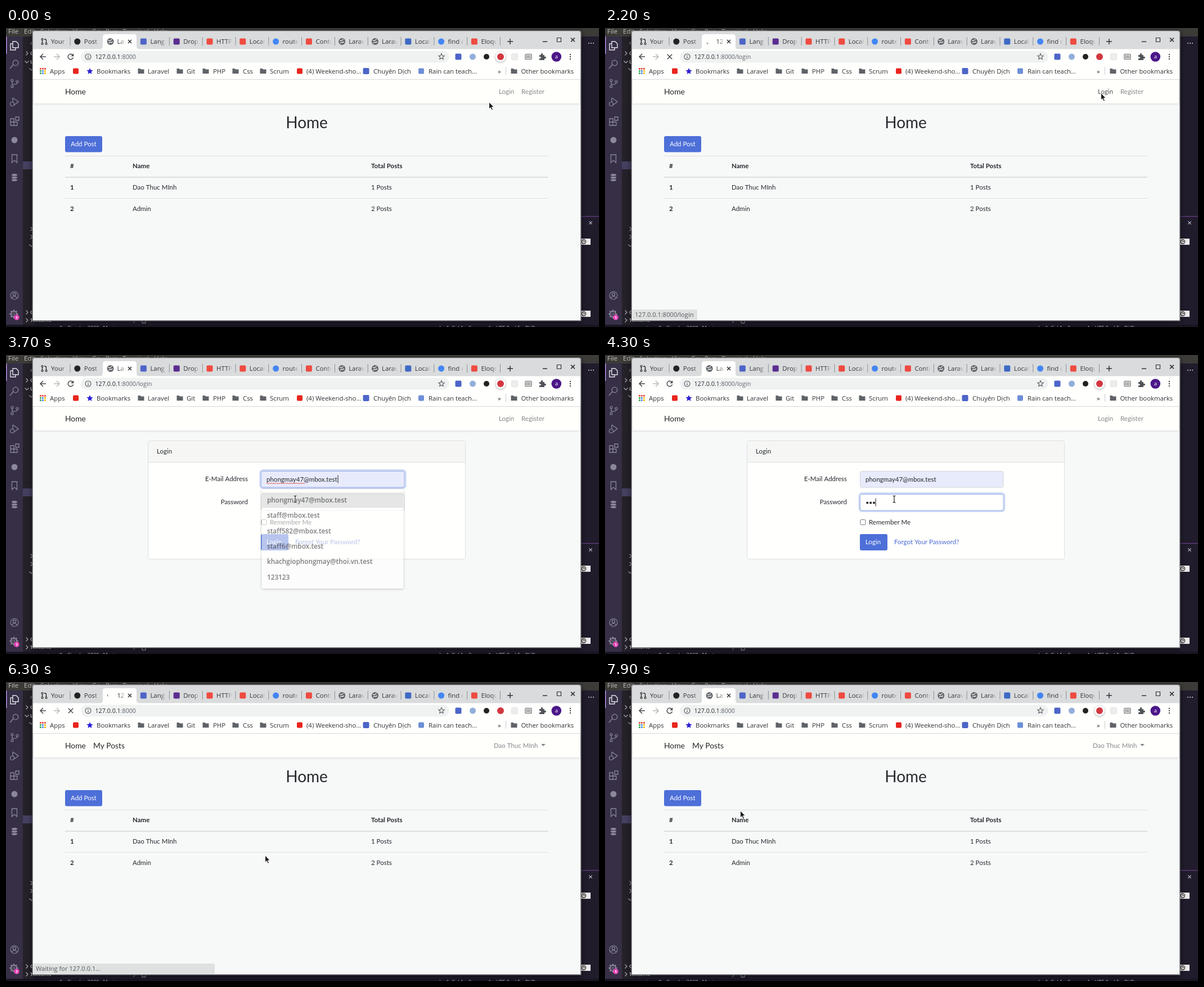
These frames come from a looping animation (1054x531 px, 8000 ms). An HTML page with a canvas:

```html
<!DOCTYPE html>
<html lang="en">
<head>
<meta charset="utf-8">
<title>Login flow</title>
<style>
html, body { margin: 0; width: 100%; height: 100%; overflow: hidden; background: #211c2c; }
canvas { display: block; }
</style>
</head>
<body>
<canvas id="stage" width="1054" height="531"></canvas>
<script>
const c = document.getElementById('stage').getContext('2d');
const LOOP = 8000, STEP = 100;
const UI = '"Open Sans", "Noto Sans", sans-serif', PAGE = 'Lato, sans-serif';
const INK = '#303236', BLUE = '#4d6fd8', RED = '#ef4a40', LINE = '#dcdfe0';
const USER = 'Dao Thuc MInh', EMAIL = 'phongmay47@mbox.test', HOST = '127.0.0.1:8000';
const SAVED = [EMAIL, 'staff@mbox.test', 'staff582@mbox.test', 'staff6@mbox.test',
  'khachgiophongmay@thoi.vn.test', '123123'];

// Pointer path: time, x, y
const PATH = [[0, 858, 131], [100, 858, 131], [500, 600, 190], [700, 450, 202], [900, 314, 158],
  [1000, 314, 158], [1100, 129, 150], [1200, 250, 135], [1300, 470, 122], [1400, 377, 117],
  [1500, 377, 117], [1700, 914, 112], [1900, 881, 115], [2300, 881, 115], [2800, 506, 220],
  [3000, 506, 220], [3200, 514, 256], [5200, 514, 256], [5700, 488, 316], [5900, 479, 336],
  [6200, 479, 336], [6500, 422, 250], [6900, 243, 166], [7300, 140, 204], [7500, 135, 206],
  [7600, 300, 225], [7700, 562, 236], [7900, 240, 228], [8000, 240, 228]];

const within = (t, a, b) => t >= a && t < b;

function pointerAt(t) {
  const i = Math.max(1, PATH.findIndex(k => k[0] >= t));
  const [t0, x0, y0] = PATH[i - 1], [t1, x1, y1] = PATH[i];
  const p = (t - t0) / (t1 - t0);
  return [x0 + (x1 - x0) * p, y0 + (y1 - y0) * p];
}

function rect(x, y, w, h, fill, r = 0, stroke, lw = 1) {
  c.beginPath();
  c.roundRect(x, y, w, h, r);
  if (fill) { c.fillStyle = fill; c.fill(); }
  if (stroke) { c.strokeStyle = stroke; c.lineWidth = lw; c.stroke(); }
}
function circle(x, y, r, fill, stroke, lw = 1) {
  rect(x - r, y - r, 2 * r, 2 * r, fill, r, stroke, lw);
}
function text(s, x, y, size, color = INK, font = UI, weight = 400, align = 'left') {
  c.font = `${weight} ${size}px ${font}`;
  c.fillStyle = color;
  c.textAlign = align;
  c.fillText(s, x, y);
}
const pageText = (s, x, y, color = '#25292d', weight = 400, size = 11.5) =>
  text(s, x, y, size, color, PAGE, weight);

// Draws an SVG path with its origin at x, y
function draw(d, x, y, stroke, lw = 1.3, fill) {
  c.save();
  c.translate(x, y);
  const p = new Path2D(d);
  if (fill) { c.fillStyle = fill; c.fill(p); }
  if (stroke) { c.strokeStyle = stroke; c.lineWidth = lw; c.stroke(p); }
  c.restore();
}
function faded(alpha, paint) {
  c.save();
  c.globalAlpha = alpha;
  paint();
  c.restore();
}
function shadowed(blur, dy, color, paint) {
  c.save();
  c.shadowBlur = blur; c.shadowOffsetY = dy; c.shadowColor = color;
  paint();
  c.restore();
}
const square = (x, y, color, s = 11) => rect(x - s / 2, y - s / 2, s, s, color, 2);
const cross = (x, y, r, color = INK, lw = 1.4) =>
  draw(`M${-r} ${-r}L${r} ${r}M${r} ${-r}L${-r} ${r}`, x, y, color, lw);
const folder = (x, y) => draw('M-5.5 -4.5h4l1.5 1.5h5.5v7.5h-11z', x, y, 0, 0, '#5f6368');
const star = r => 'M' + Array.from({ length: 10 }, (_, i) => {
  const a = i * Math.PI / 5, q = i % 2 ? r * .45 : r;
  return `${q * Math.sin(a)} ${-q * Math.cos(a)}`;
}).join('L') + 'z';

function globe(x, y) {
  circle(x, y, 6, '#5f6368');
  draw('M-4 -2.5q2 2 4 .5t2.5 -2M-3 3.5q1 -3 3 -2t3.5 -1.5', x, y, '#e8e9ea', 1.5);
}
function pullIcon(x, y) {
  draw('M-3.5 -2v5M3.5 3v-5q0 -2 -2 -2h-1.5', x, y, '#222', 1.3);
  [[-3.5, -4], [-3.5, 4], [3.5, 4]].forEach(([a, b]) => circle(x + a, y + b, 1.5, '#dcdedf', '#222', 1.2));
}

function editor() {
  rect(0, 0, 1054, 531, '#211c2c');
  rect(0, 0, 1054, 15, '#3c3b38');
  text('File', 4, 10, 11.5, '#c3c1bc');
  text('Edit   Selection   View   Go   Run   Terminal   Help', 32, 10, 11.5, '#c3c1bc');
  rect(0, 15, 30, 516, '#362f46');
  rect(30, 15, 20, 516, '#242129');
  rect(30, 237, 20, 14, '#454060');
  rect(0, 15, 1.5, 31, '#b58be0');
  const g = '#8c879a';
  draw('M-3 -7h6l4 4v7h-10zM-3 -3h-4v11h9v-4', 15, 31, '#e4e2ea', 1.4);
  circle(17, 62, 4.8, 0, g, 1.3);
  draw('M-3 3l-6 7', 16, 62, g, 1.4);
  draw('M-4 -3v7M5 -1q0 4 -8 3', 15, 98, g);
  [[-4, -5], [-4, 6], [5, -3]].forEach(([x, y]) => circle(15 + x, 98 + y, 2, 0, g, 1.2));
  draw('M-3 -8l10 7l-8 6M-3 -8v7', 15, 132, g);
  circle(11, 135, 3.5, 0, g, 1.2);
  draw('M-7 -4h6v6h6v6h-12zM-7 2h6v6M2 -7h6v6h-6z', 15, 165, g);
  circle(15, 199, 5.5, g);
  draw('M-4.5 -7h9v14l-4.5 -4l-4.5 4z', 15, 232, g);
  [270, 265.5, 261].forEach(y => {
    c.beginPath();
    c.ellipse(15, y, 5.5, 2.6, 0, 0, 2 * Math.PI);
    c.fillStyle = g; c.fill();
    c.strokeStyle = '#362f46'; c.lineWidth = .8; c.stroke();
  });
  circle(15, 475, 7, 0, g, 1.2);
  circle(15, 473, 2.6, 0, g, 1.2);
  draw('M-5 5q5 -7 10 0', 15, 475, g, 1.2);
  circle(14, 508, 5, 0, g, 2);
  circle(14, 508, 2, 0, g);
  for (let i = 0; i < 8; i++) {
    c.save();
    c.translate(14, 508);
    c.rotate(i * Math.PI / 4);
    rect(-1.2, -7.5, 2.4, 2.5, g);
    c.restore();
  }
  circle(19, 514, 4.8, '#e647b8');
  text('1', 19, 516.5, 6.5, '#fff', UI, 700, 'center');

  text('F', 43, 30, 8, '#aaa6b2');
  const right = 'M-1.5 -3.5l3.5 3.5l-3.5 3.5', down = 'M-3.5 -1.5l3.5 3.5l3.5 -3.5';
  [[right, 37, 45], [down, 37, 60], [down, 45, 73], [right, 45, 357], [right, 45, 371],
    [down, 45, 386], [right, 37, 505], [right, 37, 519]].forEach(([d, x, y]) => draw(d, x, y, '#b0acb8', 1.1));
  [['C', 48], ['L', 63], ['OUTLINE', 508], ['TIMELINE', 522]]
    .forEach(([s, y]) => text(s, 43, y, 8, '#ccc', UI, 700));
  draw('M0 -3l3 3l-3 3', 226, 521, '#bbb', 1);
  rect(242, 517, 6, 7, 0, 0, '#bbb');
  rect(0, 527, 1054, 4, '#191521');
  text('master    0    Simple   2020   Master', 56, 536, 9, '#bdb9c6');
  text('Ln 1, Col 1    Spaces: 4    UTF-8    LF    PHP', 770, 536, 9, '#bdb9c6');
  [-4, 0, 4].forEach(d => circle(1040 + d, 27, 1, '#cfcbd6'));
  rect(1022, 334, 32, 1.2, '#6c3f86');
  cross(1039, 346, 2.7, '#c4c0cc', 1.1);
  [374, 502].forEach(y => {
    rect(1020, y, 19, 11, '#eceaea');
    circle(1027, y + 5.5, 3.6, 0, '#222', 1.2);
    draw('M0 -2v2h2', 1027, y + 5.5, '#222', 1);
  });
}

const swatch = color => (x, y) => square(x, y, color);
const disc = color => (x, y) => circle(x, y, 5.5, color);
const TABS = [['Your', pullIcon], ['Post', disc('#222')], ['Laravel', globe], ['Lang', swatch('#4d65c8')],
  ['Drop', swatch('#5b2d91')], ['HTTP', swatch(RED)], ['Local', swatch(RED)], ['route', disc('#4285f4')],
  ['Contr', swatch(RED)], ['Larav', globe], ['Larav', globe], ['Local', swatch('#3e6ac5')],
  ['find c', disc('#4285f4')], ['Eloqu', swatch(RED)]];

function tabs(t, loading) {
  draw('M-6 0q6 0 6 -6v-16q0 -5 5 -5h50q5 0 5 5v16q0 6 6 6z', 172, 38, 0, 0, '#fffffd');
  TABS.forEach(([name, icon], i) => {
    const x = 55 + 58.8 * i, active = i === 2, busy = active && loading;
    if (busy) {
      const a = (t / 800) * 2 * Math.PI + 3.6;
      c.beginPath(); c.arc(x + 13, 24, 5, a, a + .7);
      c.strokeStyle = '#777'; c.lineWidth = 1.2; c.stroke();
    } else icon(x + 13, 24);
    const end = x + (active ? 40 : 53);
    const fade = c.createLinearGradient(end - 10, 0, end, 0);
    fade.addColorStop(0, INK);
    fade.addColorStop(1, '#30323600');
    c.save();
    c.beginPath(); c.rect(x + 24, 12, end - x - 24, 24); c.clip();
    text(busy ? HOST : name, x + 25, 28, 11.4, fade);
    c.restore();
    if (i !== 1 && !active) rect(x + 58.5, 16, 1, 15, '#8d9093');
  });
  cross(220, 24, 3, INK, 1.5);
  draw('M-5 0h10M0 -5v10', 896, 24, INK, 1.5);
  rect(954, 23.5, 8, 1.5, INK);
  rect(979.5, 17.5, 7, 7, 0, 0, INK, 1.2);
  cross(1007.5, 21, 3.4, INK, 1.5);
}

function toolbar(url, loading) {
  draw('M5 0h-10M0 -5l-5 5l5 5', 66, 51, '#45484c', 1.5);
  draw('M-5 0h10M0 -5l5 5l-5 5', 90, 51, '#b7babd', 1.5);
  if (loading) cross(115, 51, 4.2, '#45484c', 1.5);
  else {
    c.beginPath(); c.arc(115, 51, 4.7, .3, 5.5);
    c.strokeStyle = '#45484c'; c.lineWidth = 1.5; c.stroke();
    draw('M0 0h-5l5 -5z', 120.3, 50.3, 0, 0, '#45484c');
  }
  rect(133, 40.5, 655, 21, '#f0f2f2', 10.5);
  circle(146, 51, 5, 0, '#5f6368', 1.2);
  draw('M0 -3v1.5M0 -.5v3.5', 146, 51, '#5f6368', 1.3);
  const [ip, port] = HOST.split(':');
  text(ip, 158.5, 55, 10.7, '#26282b');
  text(`:${port}${url}`, 158.5 + c.measureText(ip).width, 55, 10.7, '#5f6368');
  draw(star(5.5), 774, 51, '#555a5e', 1.1);

  square(804, 51, '#4d65c8');
  circle(829.5, 51, 5.5, '#92aedb');
  circle(854, 51, 5, '#222');
  if (!loading) shadowed(4, 1, '#0005', () => circle(879, 51, 9, '#fff'));
  circle(879, 51, 6, '#d3373f');
  rect(898.5, 45.5, 11, 11, '#eceeee', 2, '#e0e2e2');
  rect(923, 46.5, 11, 9, 0, 1, '#5f6368', 1.2);
  for (let i = 0; i < 3; i++) rect(925.2 + 2.6 * i, 48, 1.3, 6, '#5f6368');
  draw('M-5 -3h3q-1 -3 1.5 -3t1.5 3h3v3q3 -1 3 1.5t-3 1.5v3h-9v-3q3 0 3 -1.5t-3 -1.5z', 953, 51, 0, 0, '#505458');
  circle(978.3, 51, 8.8, '#4b1689');
  text('a', 978.3, 54.3, 9.5, '#fff', UI, 400, 'center');
  [-4, 0, 4].forEach(d => circle(1003, 51 + d, 1.2, '#45484c'));
}

function bookmarks() {
  ['#ea4335', '#ea4335', '#ea4335', '#34a853', '#4285f4', '#fbbc05', '#34a853', '#4285f4', '#fbbc05']
    .forEach((k, i) => rect(60 + i % 3 * 4, 71 + Math.floor(i / 3) * 4, 2.8, 2.8, k));
  square(124, 76.5, '#e8251f', 10);
  draw(star(6), 149, 77, 0, 0, '#2b1fd6');
  [240, 309, 355, 408, 457, 903].forEach(x => folder(x, 76.5));
  square(522, 76.5, '#e8251f', 10);
  square(640, 76.5, '#4d65c8');
  square(738, 76.5, '#6d8fd6', 10);
  [['Apps', 78], ['Bookmarks', 161], ['Laravel', 252], ['Git', 321], ['PHP', 368], ['Css', 421],
    ['Scrum', 469], ['(4) Weekend-sho…', 534], ['Chuyên Dịch', 653], ['Rain can teach…', 751],
    ['»', 874], ['Other bookmarks', 915.5]].forEach(([s, x]) => text(s, x, 80.5, 11.4));
  rect(888, 69, 1, 14, '#c8cbcd');
}

function navbar(user, hoverLogin) {
  shadowed(4, 1, '#0002', () => rect(49, 92, 971, 42, '#fffffb'));
  rect(49, 91, 971, 1, '#d8dadb');
  pageText('Home', 105, 118, '#222', 400, 13.8);
  if (user) {
    pageText('My Posts', 155, 118, '#222', 400, 13.8);
    pageText(USER, 867, 116.5, '#85888a');
    draw('M-4 -2h8l-4 4z', 955, 112, 0, 0, '#85888a');
  } else {
    pageText('Login', 876, 116.5, hoverLogin ? '#505356' : '#85888a');
    pageText('Register', 916, 116.5, '#85888a');
  }
}

function home(hoverAdd) {
  text('Home', 534.5, 178, 28, '#25292d', PAGE, 400, 'center');
  rect(105, 192, 66, 28.5, hoverAdd ? '#3a5bc0' : BLUE, 3);
  pageText('Add Post', 115, 210, '#fff');
  [[227, 1], [264, 2], [302, 1]].forEach(([y, h]) => rect(105, y, 859, h, LINE));
  [['#', 'Name', 'Total Posts'], ['1', USER, '1 Posts'], ['2', 'Admin', '2 Posts']].forEach((row, r) =>
    row.forEach((s, i) => pageText(s, [114, 225, 649][i], 249 + 37.9 * r, '#25292d', r && i ? 400 : 700)));
}

function field(y, focus, fill) {
  if (focus) rect(452, y - 1.5, 258, 32, 0, 5, '#cbd8f5', 3);
  rect(453.5, y + .5, 254.5, 28.5, fill, 3, focus ? '#9db2e8' : '#cfd5da');
}
const caret = (x, y) => rect(x, y, 1, 14, '#222');

function suggestions(t) {
  const alpha = { 3600: .92, 3700: .6, 3800: .2 }[t] ?? (within(t, 3000, 3600) ? 1 : 0);
  if (!alpha) return;
  const scale = .96 + .04 * alpha;
  const panel = () => rect(452.5, 236.5, 256, 179.5, '#fffffd', 2);
  faded(alpha, () => {
    c.translate(580.5, 327); c.scale(scale, scale); c.translate(-580.5, -327);
    // A shadow under a translucent panel would grey it, so keep it outside
    c.save();
    const outside = new Path2D('M0 0H1054V531H0z');
    outside.rect(452.5, 236.5, 256, 179.5);
    c.clip(outside, 'evenodd');
    shadowed(4, 1, '#0006', panel);
    c.restore();
    panel();
    if (t >= 3200) rect(453, 243, 255, 27.5, '#d4d5d5');
    SAVED.forEach((s, i) => text(s, 462, 261 + 27.8 * i, 12, '#26282b', UI, 600));
  });
}

function login(t) {
  const onPassword = t >= 4000, filled = t >= 3600, preview = within(t, 3200, 3600);
  rect(252.5, 152.5, 564, 210, '#fffffd', 3, LINE);
  rect(253, 153, 563, 37, '#f6f7f5', [3, 3, 0, 0]);
  rect(253, 190, 563, 1, LINE);
  pageText('Login', 268, 175);
  text('E-Mail Address', 430, 224, 11.5, '#25292d', PAGE, 400, 'right');
  text('Password', 430, 265, 11.5, '#25292d', PAGE, 400, 'right');
  field(206, !onPassword, filled || preview ? '#e8ebfb' : '#fffffd');
  field(247, onPassword, '#fffffd');
  if (filled || preview) pageText(EMAIL, 463, 225);
  if (filled && !onPassword) {
    const end = c.measureText(EMAIL).width, word = c.measureText(EMAIL.split('@')[0]).width;
    draw('M0 0' + 'q1 -1.5 2 0t2 0'.repeat(Math.round(word / 4)), 463, 228, '#e04848', .9);
    caret(464 + end, 213.5);
  } else if (!onPassword && !within(t, 3000, 3400)) caret(464, 213.5);
  if (onPassword) {
    const typed = [4200, 4300, 4300, 4500, 4800, 5000, 5000, 5000].filter(k => t >= k).length;
    for (let i = 0; i < typed; i++) circle(466.3 + 5.9 * i, 262.5, 2.1, '#25292d');
    caret(463 + 5.9 * typed, 254.5);
  }
  rect(454, 292.5, 9, 9, '#fff', 1.5, '#75787b');
  pageText('Remember Me', 469, 300.5);
  rect(453, 318, 49, 29, BLUE, 3);
  pageText('Login', 463, 336, '#fff');
  pageText('Forgot Your Password?', 514, 336, '#4a6bd2');
  suggestions(t);
}

function status(t) {
  const show = (s, w, alpha) => faded(alpha, () => {
    rect(49, 500, w, 18.5, '#dfe1e1', [0, 3, 0, 0]);
    text(s, 53, 513, 11.1, '#565a5e');
  });
  if (within(t, 2100, 2500)) show(HOST + '/login', 115, t < 2400 ? 1 : .4);
  if (within(t, 6200, 7000)) show('Waiting for 127.0.0.1…', 322, t < 6800 ? 1 : t < 6900 ? .7 : .4);
  if (within(t, 7300, 7700)) show(HOST + '/posts/create', 152, t < 7600 ? 1 : .4);
}

function pointer(t) {
  const [x, y] = pointerAt(t);
  if (within(t, 2700, 5400)) {
    const beam = 'M-2.5 -6q2.5 0 2.5 1.5v9q0 1.5 -2.5 1.5M2.5 -6q-2.5 0 -2.5 1.5M0 4.5q0 1.5 2.5 1.5';
    draw(beam, x, y, '#fff', 2.6);
    draw(beam, x, y, '#222', 1.2);
  } else if (within(t, 5600, 6300) || within(t, 7300, 7600)) {
    draw('M-2.5 -5.5q1.3 -1.2 2 .5v4l4.5 1q2 .5 1.5 2.5l-1 4h-6l-4 -4.5q-.5 -2 1.5 -1l1.5 1z', x, y, '#222', 1.2, '#fff');
  } else {
    draw('M0 0v12.5l2.8 -2.6l2 4.6l2.2 -1l-2 -4.4h3.8z', x + .5, y + .5, '#fff', 1, '#1c1c1c');
  }
}

function render(t) {
  const loading = within(t, 2200, 2500) || within(t, 6000, 6800);
  const onLogin = within(t, 2400, 6300);
  editor();
  shadowed(8, 2, '#000a', () => rect(46.5, 4.5, 976, 516, '#85868a', [4, 4, 0, 0]));
  rect(48, 5.5, 973, 33, '#d9dbdc', [4, 4, 0, 0]);
  rect(48, 37.5, 973, 54, '#fffffd');
  rect(48, 92, 973, 427, '#f7f9f9');
  tabs(t, loading);
  toolbar(within(t, 2200, 6300) ? '/login' : '', loading);
  bookmarks();
  navbar(t >= 6300, within(t, 1800, 2400));
  if (onLogin) login(t); else home(within(t, 7300, 7600));
  status(t);
  pointer(t);
}

const start = performance.now();
function frame() {
  const t = (performance.now() - start) % LOOP;
  render(Math.floor(t / STEP) * STEP);
  requestAnimationFrame(frame);
}
frame();
</script>
</body>
</html>
```
